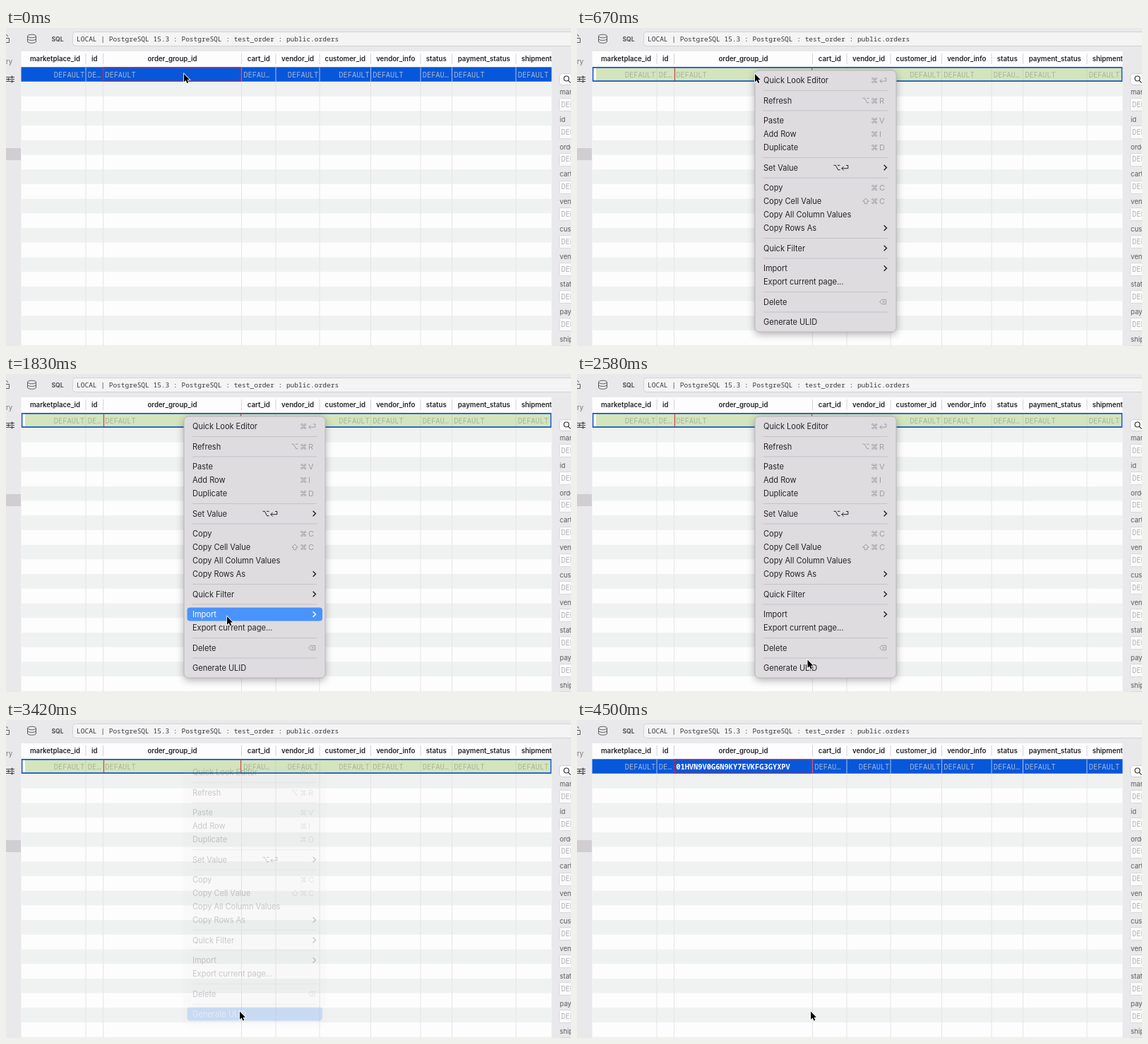
An HTML page with a canvas that plays this animation: 800 px wide and 450 px high, repeating every 4580 ms.

```html
<!DOCTYPE html>
<html lang="en">
<head>
<meta charset="utf-8">
<title>Generate ULID</title>
<style>
  html, body { margin: 0; height: 100%; overflow: hidden; background: #e9e8ea; }
  canvas { display: block; }
</style>
</head>
<body>
<canvas id="stage" width="800" height="450"></canvas>
<script>
const ctx = document.getElementById('stage').getContext('2d');
const LOOP = 4580, STEPS = 55, STEP = LOOP / STEPS;
const MENU_OPEN = 500, MENU_CLOSE = 3500;

const ui = (size, weight = 400) => `${weight} ${size}px Inter, sans-serif`;
const mono = (size, weight = 400) => `${weight} ${size}px "Noto Sans Mono", monospace`;
const symbols = '10.5px "DejaVu Sans", sans-serif';

// name, left, right, cell text, right aligned
const columns = [
  ['marketplace_id', 26, 113, 'DEFAULT', true],
  ['id', 113, 137.5, 'DE…'],
  ['order_group_id', 137.5, 333.5, 'DEFAULT'],
  ['cart_id', 333.5, 382, 'DEFAU…'],
  ['vendor_id', 382, 444, 'DEFAULT', true],
  ['customer_id', 444, 516.5, 'DEFAULT', true],
  ['vendor_info', 516.5, 587, 'DEFAULT'],
  ['status', 587, 631.5, 'DEFAU…'],
  ['payment_status', 631.5, 722, 'DEFAULT'],
  ['shipment_status', 722, 814, 'DEFAULT']
];

// label, shortcut ('>' is a submenu arrow); null is a separator
const items = [
  ['Quick Look Editor', '⌘↩'], null,
  ['Refresh', '⌥⌘R'], null,
  ['Paste', '⌘V'], ['Add Row', '⌘I'], ['Duplicate', '⌘D'], null,
  ['Set Value', '>'], null,
  ['Copy', '⌘C'], ['Copy Cell Value', '⇧⌘C'], ['Copy All Column Values', ''], ['Copy Rows As', '>'], null,
  ['Quick Filter', '>'], null,
  ['Import', '>'], ['Export current page...', ''], null,
  ['Delete', '⌫'], null,
  ['Generate ULID', '']
];

// key symbols around a vertical centre of 0
const keyShapes = {
  '↩': 'M7 -3H9.8V1.2H.8M3.6 -1.6L.8 1.2L3.6 4',
  '⌥': 'M.5 -3.2H3.3L6.6 3.2H9.5M6 -3.2H9.5',
  '⇧': 'M5 -4L9.3 .3H6.9V3.6H3.1V.3H.7Z',
  '⌫': 'M3.4 -3.2H9.6V3.2H3.4L.6 0ZM4.6 -1.5L7.6 1.5M7.6 -1.5L4.6 1.5'
};

// time, x, y of the pointer tip
const pointerPath = [
  [1417, 252, 65], [1500, 255, 75], [1583, 266, 130], [1667, 284, 220], [1750, 302, 300],
  [1833, 313, 343], [2000, 320, 384], [2333, 326.5, 404.5], [2583, 326.5, 404.5], [3000, 331, 412.5]
];

function pointerAt(t) {
  const i = pointerPath.findIndex(p => p[0] > t);
  if (i === 0) return pointerPath[0].slice(1);
  if (i < 0) return pointerPath.at(-1).slice(1);
  const [t0, x0, y0] = pointerPath[i - 1], [t1, x1, y1] = pointerPath[i];
  const k = (t - t0) / (t1 - t0);
  return [x0 + (x1 - x0) * k, y0 + (y1 - y0) * k];
}

function rect(x, y, w, h, fill) {
  ctx.fillStyle = fill;
  ctx.fillRect(x, y, w, h);
}

function rounded(x, y, w, h, r, fill, stroke) {
  ctx.beginPath();
  ctx.roundRect(x, y, w, h, r);
  if (fill) { ctx.fillStyle = fill; ctx.fill(); }
  if (stroke) { ctx.strokeStyle = stroke; ctx.lineWidth = 1; ctx.stroke(); }
}

function path(d, color, width = 1) {
  ctx.strokeStyle = color;
  ctx.lineWidth = width;
  ctx.stroke(new Path2D(d));
}

function text(str, x, y, font, color, align = 'left') {
  ctx.font = font;
  ctx.fillStyle = color;
  ctx.textAlign = align;
  ctx.fillText(str, x, y);
}

function drawToolbar() {
  rect(0, 0, 800, 450, '#e9e8ea');
  rounded(94.5, 5.5, 720, 20, 4, '#f5f4f5', '#d3d2d4');
  text('LOCAL | PostgreSQL 15.3 : PostgreSQL : test_order : public.orders', 100, 19, mono(9.52), '#38373a');
  text('SQL', 73, 18.6, ui(8.6, 700), '#555357', 'center');
  const icon = '#5d5b5f';
  path('M30.5 11.5a6 2.3 0 0 1 12 0a6 2.3 0 0 1-12 0v7.5a6 2.3 0 0 0 12 0v-7.5M30.5 15.2a6 2.3 0 0 0 12 0', icon);
  path('M-4 14.5H4.5V20.5H-4M-2 14V12a2.2 2.2 0 0 1 4.5 0', icon);
}

function drawSidebars() {
  text('ry', 0, 50.5, ui(9.6), '#77757a');
  path('M0 69.5H12M0 72.5H12M0 75.5H12', '#4c4a4e');
  path('M8.5 67.8v3.4M3.5 70.8v3.4M8.5 73.8v3.4', '#4c4a4e', 1.8);
  rect(0, 170, 21, 17, '#d0ced1');

  rounded(783.5, 64.5, 40, 16, 4, '#fdfcfd', '#d0cfd1');
  path('M797 71.5a3.5 3.5 0 1 1-7 0a3.5 3.5 0 0 1 7 0M796 74.2l3.5 3.5', '#333', 1.2);
  columns.forEach(([name], i) => {
    const y = 90 + i * 38.87;
    text(name, 784, y + 3.8, ui(9.5), '#5c5a5e');
    rounded(783.5, Math.round(y + 9) + .5, 40, 18, 1, '#fbfafb', '#d9d8da');
    text('DEFAULT', 786, y + 21.7, mono(10.37), '#b3b2b5');
  });
}

function drawTable(editing, done) {
  ctx.save();
  ctx.beginPath();
  ctx.rect(21.5, 33, 751, 417);
  ctx.clip();
  rect(21, 33, 752, 417, '#fefdfe');
  for (let i = 0; i < 10; i++) rect(21, 76 + i * 41.4, 752, 20.7, '#f0f2f2');
  for (const [name, left, right] of columns) {
    rect(right - .5, 55, 1, 395, '#e4e4e6');
    rect(right - .5, 36, 1, 15, '#d2d1d4');
    text(name, (left + right) / 2, 46.5, ui(9.65, 600), '#242326', 'center');
  }

  if (editing) rect(27, 56, 745, 19.5, '#d4e5bb');
  else rect(21, 55.3, 752, 20.5, '#0757da');

  for (const [name, left, right, value, alignRight] of columns) {
    rect(right - .5, 55.5, 1, 20.3, editing ? '#c6d7b0' : '#a9c3ee');
    if (done && name === 'order_group_id') {
      text('01HVN9V0G6N9KY7EVKFG3GYXPV', left + 2.7, 69.7, mono(10.37, 600), '#fff');
    } else {
      const color = editing ? '#a9b59a' : '#a5b5d0';
      text(value, alignRight ? right - 1.7 : left + 2.7, 69.7, mono(10.37, 500), color, alignRight ? 'right' : 'left');
    }
  }
  if (editing) {
    path('M138.5 57V74.5M332.5 57V74.5', '#cf4a3f', 1.2);
    path('M22.5 55.8H771.7V75.2H22.5Z', '#1157cd', 1.8);
  } else {
    path('M137.5 55.8H333V75.4H137.5Z', '#dc2438', 1.2);
  }
  ctx.restore();
}

function drawKey(key, x, y, color) {
  if (!keyShapes[key]) {
    text(key, x, y + 4, key === '⌘' ? symbols : ui(11), color);
    return;
  }
  ctx.save();
  ctx.translate(x, y);
  path(keyShapes[key], color);
  ctx.restore();
}

function drawShortcut(keys, y, color) {
  if (keys === '>') path(`M434.6 ${y - 3.8}l3.8 3.8l-3.8 3.8`, color, 1.5);
  else [...keys].reverse().forEach((key, i) => drawKey(key, 428 - i * 12, y, '#a09ea2'));
}

function drawMenu(alpha, px, py) {
  ctx.save();
  // the panel fades faster than its contents
  ctx.globalAlpha = alpha ** 2;
  ctx.shadowColor = 'rgba(0,0,0,.32)';
  ctx.shadowBlur = 12;
  ctx.shadowOffsetY = 3;
  rounded(252, 60, 200, 370, 6, '#dedcdf');
  ctx.shadowColor = 'transparent';
  rounded(252, 60, 200, 370, 6, null, '#b9b7ba');

  let y = 74;
  for (const item of items) {
    ctx.globalAlpha = alpha;
    if (!item) {
      rect(264, y - 5, 176, 1, '#c4c2c5');
      y += 9.5;
      continue;
    }
    const [label, keys] = item;
    const hot = px > 256 && Math.abs(py - y) < 9.5;
    const color = hot ? '#fff' : '#252427';
    if (hot) {
      rounded(256.5, y - 9.5, 191.5, 19, 4, '#4a93fb');
      ctx.globalAlpha = Math.sqrt(alpha);
    }
    text(label, 264, y + 4.2, ui(11.03), color);
    drawShortcut(keys, y, color);
    if (label === 'Set Value') {
      drawKey('⌥', 363, y, color);
      drawKey('↩', 374, y, color);
    }
    y += 19;
  }
  ctx.restore();
}

function drawPointer(x, y) {
  ctx.save();
  ctx.translate(x, y);
  const arrow = new Path2D('M0 0V11.3L2.6 8.9L4.4 13L6.3 12.2L4.6 8.2H8Z');
  ctx.strokeStyle = '#fff';
  ctx.lineWidth = 1.6;
  ctx.stroke(arrow);
  ctx.fillStyle = '#000';
  ctx.fill(arrow);
  ctx.restore();
}

function draw(now) {
  const step = Math.floor((now % LOOP + 4) / STEP) % STEPS;
  const t = step * 250 / 3 + 1; // the picture advances twelve times a second
  const [x, y] = pointerAt(t);
  const editing = t >= MENU_OPEN && t < MENU_CLOSE;
  drawToolbar();
  drawSidebars();
  drawTable(editing, t >= MENU_CLOSE);
  if (editing) {
    const alpha = Math.min(1, Math.max(0, (3458 - t) / 180));
    drawMenu(alpha, x, y);
  }
  drawPointer(x, y);
}

const start = performance.now();
function tick() {
  draw(performance.now() - start);
  requestAnimationFrame(tick);
}
tick();
</script>
</body>
</html>
```
